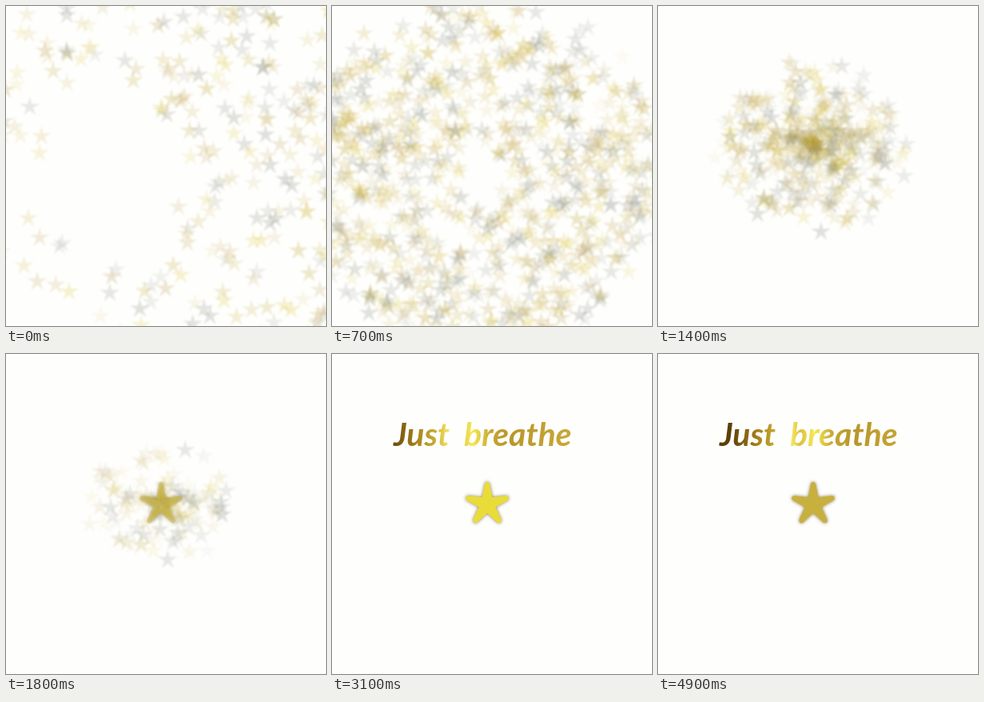
Animation of 400x400 px, one loop 5000 ms. Source, as an HTML page with a canvas:

```html
<!DOCTYPE html>
<html>
<head>
<meta charset="utf-8">
<style>
html, body { margin: 0; width: 100%; height: 100%; overflow: hidden; background: #fefefc; }
canvas, svg { position: absolute; left: 0; top: 0; }
text { font: italic 700 41px Lato, "Open Sans", sans-serif; fill: url(#gold); }
</style>
</head>
<body>
<canvas id="stage" width="400" height="400"></canvas>
<svg width="400" height="400">
  <defs>
    <linearGradient id="gold" gradientUnits="userSpaceOnUse" x1="70" y1="0" x2="295" y2="0">
      <stop offset="0" stop-color="#5c3f06"/>
      <stop offset=".16" stop-color="#a8841c"/>
      <stop offset=".26" stop-color="#c8ac34"/>
      <stop offset=".34" stop-color="#f6e866"/>
      <stop offset=".39" stop-color="#dcc040"/>
      <stop offset=".47" stop-color="#f6ea52"/>
      <stop offset=".57" stop-color="#c6a634"/>
      <stop offset=".68" stop-color="#b8962a"/>
      <stop offset="1" stop-color="#c8a838"/>
    </linearGradient>
  </defs>
  <g id="words"><text x="77" y="115">Just</text><text x="165" y="115">breathe</text></g>
</svg>
<script>
const ctx = document.getElementById('stage').getContext('2d');
const words = document.getElementById('words');
const gold = document.getElementById('gold');
const LOOP = 5000, STEP = 100, TAU = Math.PI * 2;

let seed = 11;
function rand() {
  seed = (seed * 16807) % 2147483647;
  return seed / 2147483647;
}
const clamp = v => Math.max(0, Math.min(1, v));

// Linear interpolation through rows of [time, value, value, ...]
function track(rows, t) {
  let i = 1;
  while (i < rows.length - 1 && t > rows[i][0]) i++;
  const a = rows[i - 1], b = rows[i], k = clamp((t - a[0]) / (b[0] - a[0]));
  return a.slice(1).map((v, j) => v + (b[j + 1] - v) * k);
}

function starPath(c, x, y, outer, inner) {
  c.beginPath();
  for (let i = 0; i < 10; i++) {
    const r = i % 2 ? inner : outer, a = i * TAU / 10 - TAU / 4;
    c.lineTo(x + r * Math.cos(a), y + r * Math.sin(a));
  }
  c.closePath();
}

// Soft small star, drawn once per tint
function sprite(color) {
  const cv = document.createElement('canvas');
  cv.width = cv.height = 32;
  const c = cv.getContext('2d');
  c.filter = 'blur(0.9px)';
  c.fillStyle = color;
  starPath(c, 16, 16, 13, 4.2);
  c.fill();
  return cv;
}
const grey = sprite('rgb(122,128,116)');
const tints = [grey, grey, ...['178,150,20', '216,192,40', '186,150,70', '214,184,90']
  .map(c => sprite(`rgb(${c})`))];

// Time, centre x, centre y, inner radius, outer radius, height ratio, spread exponent
const swarm = [
  [0, 140, 188, 60, 390, 1, 0.6],
  [400, 192, 225, 40, 330, 1, 0.45],
  [1000, 174, 192, 0, 172, 0.8, 0.65],
  [1400, 194, 173, 0, 135, 0.88, 1.05],
  [1800, 194, 185, 0, 112, 0.7, 1],
  [2200, 194, 190, 0, 95, 0.6, 1],
  [2500, 194, 188, 0, 60, 0.6, 1]
];

const flock = Array.from({ length: 860 }, (_, i) => {
  const last = i < 18;
  return {
    angle: rand() * TAU,
    reach: rand() * (0.7 + 0.3 * rand()),
    tint: last ? grey : tints[Math.floor(rand() * tints.length)],
    alpha: last ? 0.17 : 0.1 + rand() * 0.13,
    end: last ? 2500 : 800 + rand() * 1250
  };
});

function drawSwarm(t) {
  const [cx, cy, inner, outer, ratio, power] = track(swarm, t);
  const early = clamp(1 - t / 400);
  for (const p of flock) {
    const fade = clamp((p.end - t) / 300);
    if (!fade) continue;
    const skew = 1 + 0.3 * early * (1 - Math.cos(p.angle + 0.6));
    const r = (inner + (outer - inner) * p.reach ** power) * skew;
    ctx.globalAlpha = p.alpha * fade;
    ctx.drawImage(p.tint, cx + r * Math.cos(p.angle) - 16, cy + r * ratio * Math.sin(p.angle) - 16);
  }
  ctx.globalAlpha = 1;
}

function drawStar(t) {
  ctx.save();
  ctx.globalAlpha = clamp((t - 1500) / 600);
  const glow = 0.5 + 0.5 * Math.cos((t - 3100) / 1800 * Math.PI);
  const mix = (a, b) => Math.round(a + (b - a) * glow);
  ctx.lineJoin = 'round';
  ctx.lineWidth = 6;
  ctx.fillStyle = ctx.strokeStyle = `rgb(${mix(200, 234)},${mix(176, 220)},${mix(62, 56)})`;
  ctx.shadowColor = 'rgba(100,80,20,.75)';
  ctx.shadowBlur = 4;
  starPath(ctx, 194, 188, 25, 6.8);
  ctx.stroke();
  ctx.shadowColor = 'transparent';
  ctx.fill();
  ctx.restore();
}

function frame(now) {
  const t = Math.floor(now % LOOP / STEP) * STEP;
  ctx.clearRect(0, 0, 400, 400);
  if (t < 2500) drawSwarm(t);
  if (t > 1500) drawStar(t);
  words.setAttribute('visibility', t < 2500 ? 'hidden' : 'visible');
  gold.setAttribute('gradientTransform', `translate(${(t - 3100) / 90} 0)`);
  requestAnimationFrame(frame);
}
frame(0);
</script>
</body>
</html>
```
